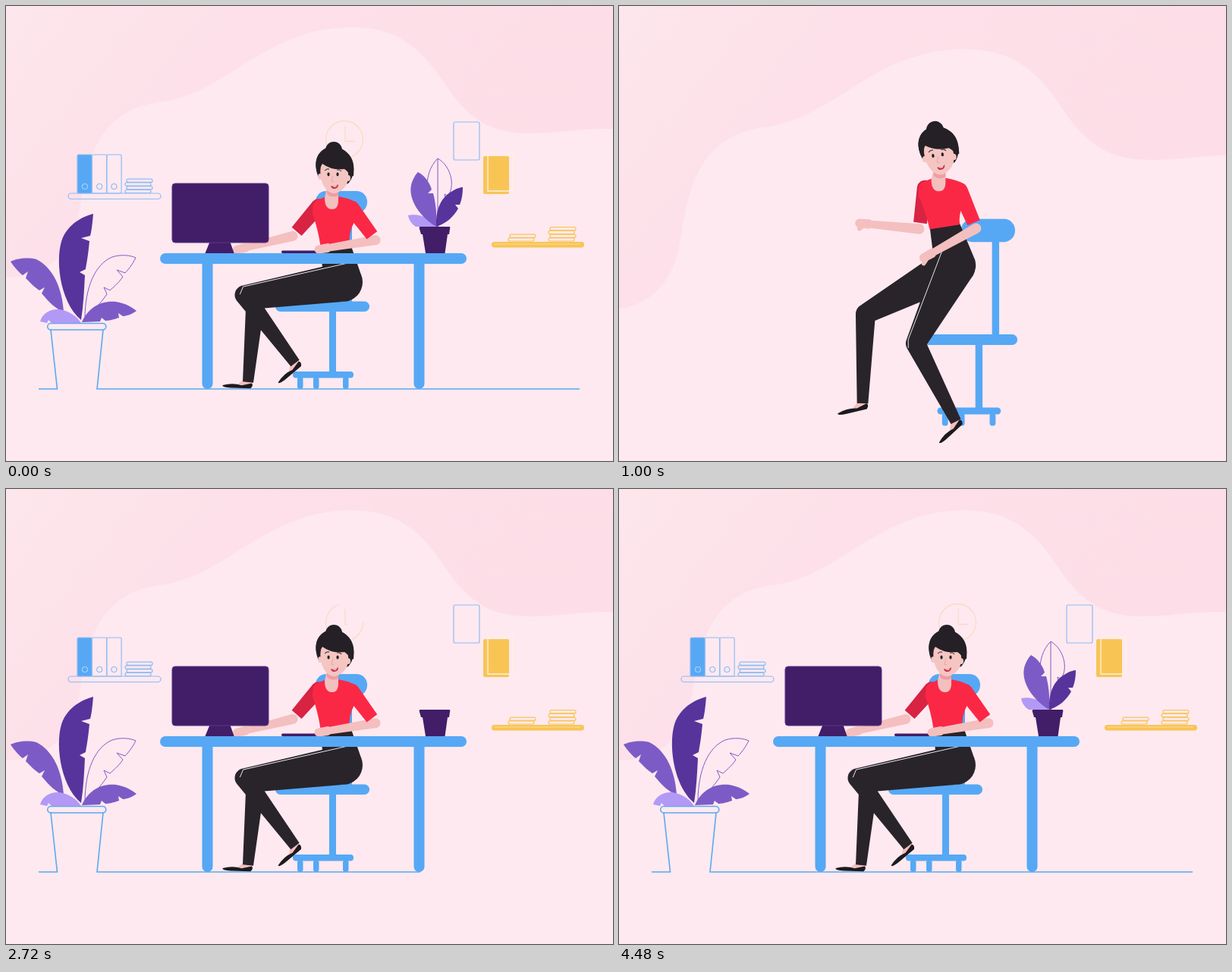
Animation of 800x600 px, one loop 4.52 s. Source, as an HTML page:

```html
<!DOCTYPE html>
<html lang="en">
<head>
<meta charset="utf-8">
<title>Desk scene</title>
<style>
html, body { margin: 0; width: 100%; height: 100%; overflow: hidden; background: #fddfe8; }
svg { display: block; width: 100vw; height: 100vh; }
</style>
</head>
<body>
<svg id="stage" viewBox="0 0 800 600"></svg>
<script>
const LOOP = 4520, STEP = 40;
const BLUE = '#56a8f5', THIN = '#8fbcf4', GOLD = '#f8c555', PLUM = '#421d68';
const DARK = '#57349b', MID = '#7c5bc7', LILAC = '#b299f5';
const RED = '#fb2845', WINE = '#d82343', SKIN = '#f4bfbf', BLACK = '#28242a';

const box = (x, y, w, h, r, attrs) =>
  `<rect x="${x}" y="${y}" width="${w}" height="${h}" rx="${r}" ${attrs}/>`;
const shape = (id, d, attrs) => `<path id="${id}" d="${d}" ${attrs}/>`;
const fill = c => `fill="${c}"`;
const line = (c, w = 1.2) => `fill="none" stroke="${c}" stroke-width="${w}"`;
const repeat = (n, draw) => Array.from({ length: n }, (_, i) => draw(i)).join('');
const sheets = (x, bottom, n, c) => repeat(n, i =>
  box(x + (i % 2 ? 2 : 0), bottom - 4.7 * (i + 1), 34, 4.2, 2, line(c)));

const binders = box(94, 196, 19.3, 51, 1.5, fill(BLUE) + ' id="binderFill"') +
  repeat(3, i => box(94 + 19.4 * i, 196, 19.3, 51, 1.5, line(THIN)));
const rings = repeat(3, i => `<circle cx="${104 + 19.2 * i}" cy="238" r="3.5" ${line(i ? THIN : '#a5cffa')}/>`);
const casters = [384, 405, 444].map(x => box(x, 489, 7.5, 16, 3.5, '')).join('');

const head = `
  <circle cx="3" cy="-70" r="11"/>
  <path d="M-17-34C-24-52-21-66-6-72 4-76 14-73 21-66 32-57 32-36 22-26Q8-20-10-36Z"/>
  <g id="face" fill="#f5c5c2">
    <ellipse cx="-15" cy="-35" rx="2.8" ry="4"/>
    <path d="M-14-52C-16-38-14-26-6-17Q2-10 10-15 20-20 22-32V-50Z"/>
    <ellipse cx="22" cy="-33" rx="3" ry="4"/>
    <g fill="#211e24"><ellipse cx="-4" cy="-38" rx="1.6" ry="2.4"/><ellipse cx="8" cy="-38" rx="1.6" ry="2.4"/></g>
    <path d="M-9-43q3-3 6-2M7-44q4-1 6 2" ${line('#28242a', 1)}/>
    <path d="M2-36l-2 7 3 1" ${line('#eaa5a5', 1)}/>
    <path d="M-1-23q6 2 10-2 0 6-6 6-3 0-4-4z" fill="#c9304a"/>
    <path d="M1-22.500q4 1 6-1-1 4-6 1z" fill="#fff"/>
  </g>
  <path d="M-19-40C-26-68-6-76 4-74 20-73 32-58 29-36L25-35Q22-42 17-45 0-43-12-52-15-48-15-42Z"/>`;

const foot = `<path d="M-6-3H6L6 4-15 6Z" ${fill(SKIN)}/>
  <path d="M-33 7Q-20 2-8 5L5 1Q8 4 4 8L-22 9.500Q-34 10-33 7Z" fill="#1d1a1f"/>`;

stage.innerHTML = `
<defs>
  <linearGradient id="sky" x1="0" y1="0" x2="1" y2=".6">
    <stop offset="0" stop-color="#fde6ec"/><stop offset=".3" stop-color="#fde0e9"/><stop offset="1" stop-color="#fddde7"/>
  </linearGradient>
  <clipPath id="aboveDesk"><rect width="800" height="330"/></clipPath>
</defs>
<rect width="800" height="600" fill="url(#sky)"/>
<g id="hill"><path fill="#fee9f0" d="M-80 362C-50 364-20 359 0 358 60 356 84 324 95 280 105 220 112 140 200 127 290 118 340 28 455 28 520 28 550 60 580 105 610 150 640 168 690 168 730 168 760 161 800 162L900 160V760H-80Z"/></g>
<g id="world">
  ${shape('ground', 'M43 505H67.500L59 427A4 4 0 0 1 59 418.500H127A4 4 0 0 1 128 427L120 505H756', line('#5ba9f0', 1.6))}
  ${shape('rim', 'M58 427H128', line('#5ba9f0', 1.6))}
  ${shape('leafLeft', 'M76 403C74 372 62 345 40 334 28 331 14 333 6 337 12 346 18 352 22 355l7-5-3 9C35 368 38 371 44 375l7-4-4 8C58 392 65 399 76 403Z', fill(MID))}
  ${shape('leafOutline', 'M104 413C104 370 118 340 140 331 152 327 165 329 171 332 166 342 160 349 157 352l-11-4 8 9C148 366 140 372 137 375l-8-4 4 9C125 392 115 402 104 413', line(MID, 1))}
  ${shape('leafTall', 'M99 414C70 390 64 330 75 305 86 283 105 277 115 274 114 285 113 296 111 303l-12 3 11 4C108 330 107 335 105 347l-8 4 7 4C103 375 102 395 99 414Z', fill(DARK))}
  ${shape('leafLow', 'M45 416C48 404 60 399 70 400 84 402 94 410 99 418H60l-4-4-2 4Z', fill(LILAC))}
  ${shape('leafRight', 'M100 417C108 398 125 388 145 390 158 392 167 398 172 402 165 407 158 409 154 409l-6-4 1 6C140 414 135 415 131 415l-5-4-2 5Z', fill(MID))}
  <g id="blueShelf">
    ${box(82, 247, 122, 7.5, 3.7, line(THIN))}
    <g id="binders">${binders}</g>
    <g id="shelfBits">${rings}${sheets(157, 247, 4, THIN)}</g>
  </g>
  ${shape('frame', 'M624 172V155Q624 153 622 153H592Q590 153 590 155V201Q590 203 592 203H622Q624 203 624 201Z', line(THIN) + ' pathLength="1"')}
  <g id="note">${box(629, 198, 34, 50, 2, fill(GOLD))}</g>
  ${shape('noteLine', 'M668 212V195H635V244H668Z', line('#fff1df', 1.3) + ' pathLength="1"')}
  <g id="goldShelf">
    ${box(640, 311, 122, 7.5, 3.7, fill(GOLD))}
    <path d="M643 314H757" ${line('#fbdc98', 1)}/>
    <g id="goldSheets">${sheets(662, 310.5, 2, GOLD)}${sheets(715, 310.5, 4, GOLD)}</g>
  </g>
  <g id="clock" ${line('#f8ddc3', 1.3)}>
    <circle cx="446" cy="176" r="24.500" pathLength="1"/><path d="M447 158V178.500H460" pathLength="1"/>
  </g>
</g>
<g id="chair" ${fill(BLUE)}>
  <g id="seat">${box(355, 389.5, 124, 13.5, 6.7, '')}</g>
  <rect id="post" x="426" width="9"/>
  <rect id="backPost" x="447" width="9"/>
  <g id="back">${box(408, 244, 68, 29, 14, '')}</g>
  ${box(378, 482, 80, 8.5, 4, '')}${casters}
</g>
<g id="keyboard">${box(363, 322.5, 52, 3.5, 1.7, fill(PLUM))}</g>
<g id="woman">
  ${shape('arm1', '', fill(SKIN))}${shape('sleeve1', '', fill(WINE))}
  <g id="foot1">${foot}</g><g id="foot2">${foot}</g>
  ${shape('legs', '', fill(BLACK))}${shape('seam', '', line('#e8e4e8', 1))}
  ${shape('shirt', '', fill(RED))}
  <g id="neck"><path d="M-6-20H9V-4Q9 8 1 8-9 8-9-7Z" ${fill(SKIN)}/><path d="M-6-20H9V-10Q0-6-6-12Z" fill="#ee9da3"/></g>
  <g id="head" fill="#242026">${head}</g>
  ${shape('arm2', '', fill(SKIN))}${shape('sleeve2', '', fill(RED))}
</g>
<g clip-path="url(#aboveDesk)"><g id="monitor" ${fill(PLUM)}>
  <path d="M269 310H295L301 327H262Z"/>${box(219, 234, 127, 78, 4, 'stroke="#5d3785"')}
</g></g>
<g ${fill(BLUE)}>
  <rect id="deskLeg1" x="258.500" y="332" width="14" rx="7"/><rect id="deskLeg2" x="537.500" y="332" width="14" rx="7"/>
  <rect id="deskTop" x="203" y="326" height="14" rx="7"/>
</g>
<g id="pot">
  ${shape('potCentre', 'M569 291C552 260 548 222 569 201 588 212 592 240 582 250l-4-2 1 6C577 268 573 280 569 291V201', line(MID, 1))}
  ${shape('potLow', 'M530 276C545 273 560 280 566 291H540Q531 285 530 276Z', fill(LILAC))}
  ${shape('potLeft', 'M567 291C545 278 530 255 534 236 536 228 540 222 543 219 552 224 558 232 561 242l-5 5 7 0C567 262 568 278 567 291Z', fill(MID))}
  ${shape('potRight', 'M567 291C566 270 572 252 590 243 595 240 600 239 602 239 602 250 600 257 598 262l-6 0 4 5C590 278 580 287 567 291Z', fill(DARK))}
  <path d="M546 291H584Q586 291 585 294L584 301H582L578.500 326H553L549 301H547L545 294Q544 291 546 291Z" ${fill(PLUM)}/>
</g>`;

const el = {};
stage.querySelectorAll('[id]').forEach(n => el[n.id] = n);
const set = (id, attrs) => { for (const k in attrs) el[id].setAttribute(k, attrs[k]); };
const move = (id, transform) => set(id, { transform });
const fade = (id, opacity) => set(id, { opacity });

// Easing
const smooth = u => u * u * (3 - 2 * u);
const easeIn = u => u * u;
const easeOut = u => 1 - (1 - u) ** 2;
const backOut = u => 1 - 2.2 * (1 - u) ** 3 + 1.2 * (1 - u) ** 2;
const progress = (t, start, end) => Math.min(1, Math.max(0, (t - start) / (end - start)));
const tween = (t, start, end, from, to, ease = smooth) =>
  from + (to - from) * ease(progress(t, start, end));
const settle = (t, end) => (1 + Math.cos(Math.PI * progress(t, 0, end))) / 2;
const bump = (t, start, end) => Math.sin(Math.PI * progress(t, start, end)) ** 2;

// Monotone cubic through key values.
function spline(t, times, values) {
  const n = values.length;
  if (t <= times[0]) return values[0];
  if (t >= times[n - 1]) return values[n - 1];
  const i = times.findIndex(x => x >= t) - 1;
  const slope = j => (values[j + 1] - values[j]) / (times[j + 1] - times[j]);
  const tangent = j => {
    if (j < 1 || j > n - 2) return 0;
    const a = slope(j - 1), b = slope(j);
    return a * b <= 0 ? 0 : 2 * a * b / (a + b);
  };
  const h = times[i + 1] - times[i], u = (t - times[i]) / h, w = 1 - u;
  return values[i] * w * w * (1 + 2 * u) + values[i + 1] * u * u * (3 - 2 * u)
    + h * (tangent(i) * u * w * w - tangent(i + 1) * u * u * w);
}

// Key points: standing, lowering, leaning back, reaching, typing. The last one holds.
const poseTimes = [680, 1000, 1600, 2280, 2600];
const keyPoints = {
  neck: [[419, 311], [421, 236], [434, 258], [433, 260], [429, 260]],
  head: [[413, 260], [421, 188], [449, 213], [434, 213], [433, 214]],
  hand1: [[361, 426], [323, 287], [315, 240], [316, 303], [310, 320]],
  hand2: [[448, 404], [407, 329], [382, 272], [412, 317], [418, 320]],
  hip: [[437, 398], [443, 342], [442, 362], [444, 364]],
  knee1: [[374, 527], [325, 406], [316, 330], [329, 387]],
  ankle1: [[390, 649], [321, 524], [306, 442], [319, 496]],
  knee2: [[420, 540], [391, 445], [342, 315], [314, 381]],
  ankle2: [[470, 652], [444, 548], [302, 415], [381, 471]]
};
const pose = (t, values) => spline(t, poseTimes, values);

const add = (p, x, y) => [p[0] + x, p[1] + y];
const along = (p, d, l) => add(p, d[0] * l, d[1] * l);
const mix = (a, b, u) => [a[0] + (b[0] - a[0]) * u, a[1] + (b[1] - a[1]) * u];
const gap = (a, b) => Math.hypot(b[0] - a[0], b[1] - a[1]);
const dir = (a, b) => { const l = gap(a, b) || 1; return [(b[0] - a[0]) / l, (b[1] - a[1]) / l]; };
const xy = p => p[0].toFixed(2) + ' ' + p[1].toFixed(2);

// Middle joint of a two-bone arm.
function elbowOf(shoulder, hand, upper, lower) {
  const l = gap(shoulder, hand), d = dir(shoulder, hand);
  const a = Math.min(upper, (upper ** 2 - lower ** 2 + l ** 2) / (2 * l));
  return along(along(shoulder, d, a), [d[1], -d[0]], Math.sqrt(Math.max(0, upper ** 2 - a ** 2)));
}

// Tapered capsule, optionally flat at its far end.
function limb(a, ra, b, rb, flat) {
  const [x, y] = dir(a, b);
  const side = (p, r) => xy(add(p, -y * r, x * r));
  return `M${side(a, ra)}A${ra} ${ra} 0 0 1 ${side(a, -ra)}L${side(b, -rb)}` +
    (flat ? 'L' : `A${rb} ${rb} 0 0 1 `) + side(b, rb) + 'Z';
}

function arm(n, shoulder, hand, z) {
  const elbow = elbowOf(shoulder, hand, 52 * z, 70 * z), d = dir(elbow, hand);
  const tip = along(hand, d, 6 * z), thumb = add(tip, 0, 7 * z);
  set('arm' + n, { d: limb(elbow, 6.5 * z, hand, 4.5 * z) + limb(mix(hand, elbow, .08), 6 * z, tip, 5.5 * z)
    + limb(hand, 4 * z, thumb, 2.8 * z) });
  set('sleeve' + n, { d: limb(shoulder, 10 * z, mix(shoulder, elbow, .85), 8.5 * z, true) });
}

function drawWoman(t, z) {
  const j = {};
  for (const name in keyPoints)
    j[name] = [0, 1].map(axis => pose(t, keyPoints[name].map(p => p[axis])));
  const shift = (name, x, y) => j[name] = add(j[name], x, y);

  const stride = Math.sin(Math.max(0, 680 - t) / 75);
  const walk = 540 * (1 - progress(t, 40, 680)) ** 1.7;
  [1, -1].forEach((s, i) => {
    shift('knee' + (i + 1), 28 * s * stride, -6 * s * stride);
    shift('ankle' + (i + 1), 65 * s * stride, -12 * s * stride);
  });
  move('woman', `translate(${walk} ${-4 * Math.abs(stride)})`);

  const hop = bump(t, 1000, 1320);
  for (const name of ['neck', 'head', 'hand1', 'hand2']) shift(name, 0, -16 * hop);
  shift('knee1', -8 * hop, -20 * hop);
  shift('ankle1', -45 * hop, -25 * hop);

  const { neck, hip } = j, hipSize = 26 * z;
  const waist = add(along(neck, dir(neck, hip), 53 * z), -3, 0);
  const s1 = add(neck, -17 * z, 4 * z), s2 = add(neck, 27 * z, 7 * z);
  arm(1, s1, j.hand1, z);
  arm(2, s2, j.hand2, z);

  const dangle = pose(t, [-10, -12, -32, 0]);
  let legs = limb(waist, 19 * z, hip, hipSize);
  for (const n of [1, 2]) {
    const knee = j['knee' + n], ankle = j['ankle' + n], shin = dir(knee, ankle);
    legs += limb(hip, hipSize, knee, 12.5 * z) + limb(knee, 12.5 * z, ankle, 7 * z, true);
    const angle = -Math.atan2(shin[0], shin[1]) * 180 / Math.PI + dangle;
    move('foot' + n, `translate(${xy(ankle)}) rotate(${angle}) scale(${z})`);
  }
  set('legs', { d: legs });

  const thigh = dir(hip, j.knee2), shin = dir(j.knee2, j.ankle2), normal = [-thigh[1], thigh[0]];
  const from = along(along(hip, normal, 24), thigh, -10), bend = along(j.knee2, normal, 11);
  const turn = dir([0, 0], add(thigh, ...shin));
  set('seam', { d: `M${xy(from)}L${xy(bend)}L${xy(along(bend, turn, 11))}` });

  const at = (p, x, y) => xy(add(p, x * z, y * z));
  set('shirt', { d: `M${at(neck, -9, -8)}L${at(s1, -2, -8)}Q${at(s1, -9, -5)} ${at(s1, -8, 10)}`
    + `Q${at(mix(s1, waist, .6), -14, 0)} ${at(waist, -19, 4)}L${at(waist, 19, -2)}`
    + `Q${at(mix(s2, waist, .6), 9, 0)} ${at(s2, 9, 8)}L${at(s2, 6, -8)}Q${at(s2, -2, -13)} ${at(neck, 8, -9)}Z` });
  move('neck', `translate(${xy(neck)}) scale(${z})`);
  const idle = 1.4 * bump(t, 2600, 4480), tilt = pose(t, [-11, -8, 18, 9, 0]);
  move('head', `translate(${xy(add(j.head, idle, 0))}) rotate(${tilt + idle}) scale(${z}) translate(-4 46)`);
  move('face', `translate(${-.2 * Math.max(0, tilt)} 0)`);
}

function drawChair(t, z, y) {
  const slide = spline(t, [40, 680, 1000, 1640], [640, 114, 45, 0]);
  move('chair', `translate(${455 * (1 - z) + slide} ${y - tween(t, 680, 1060, 24, 0)}) scale(${z})`);
  const seat = tween(t, 620, 860, 22, 0), back = tween(t, 670, 960, 154, 0);
  move('seat', `translate(0 ${seat})`);
  move('back', `translate(0 ${back})`);
  set('post', { y: 396 + seat, height: 90 - seat });
  set('backPost', { y: 258 + back, height: Math.max(0, 138 + seat - back) });
}

const reveal = (node, u) => {
  node.setAttribute('stroke-dasharray', `${u} 2`);
  node.setAttribute('opacity', u > .001 ? 1 : 0);
};
const leaf = (id, x, y, angle, size) =>
  move(id, `translate(${x} ${y}) rotate(${angle}) scale(${size}) translate(${-x} ${-y})`);

function drawRoom(t) {
  move('blueShelf', `translate(${tween(t, 1160, 1440, -240, 0, easeOut)} 0)`);
  fade('shelfBits', tween(t, 1440, 1640, 0, 1));
  move('binders', `translate(0 247) scale(1 ${tween(t, 1600, 1920, 0, 1)}) translate(0 -247)`);
  fade('binderFill', tween(t, 2080, 2560, 0, 1));
  reveal(el.frame, tween(t, 1260, 1780, 0, 1, easeOut));
  reveal(el.noteLine, tween(t, 1360, 1800, 0, 1, easeOut));
  move('note', `translate(${tween(t, 1200, 1840, 200, 0, easeOut)} 0) rotate(${tween(t, 1200, 1920, -60, 0)} 646 223)`);
  fade('note', tween(t, 1200, 1800, 0, 1, easeOut));
  move('goldShelf', `translate(${tween(t, 1660, 2080, 180, 0, easeOut)} 0)`);
  fade('goldSheets', tween(t, 2080, 2440, 0, 1));
  for (const part of el.clock.children) reveal(part, tween(t, 2400, 2900, 0, 1));

  const drawn = spline(t, [1420, 1600, 2280, 3280, 4520], [0, 127, 570, 807, 915]);
  set('ground', { 'stroke-dasharray': `${drawn} 2000`, opacity: drawn > 0 ? 1 : 0 });
  fade('rim', tween(t, 1760, 1920, 0, 1));

  const size = tween(t, 1760, 2240, 0, 1, backOut);
  leaf('leafTall', 99, 416, tween(t, 1740, 2240, -14, 0), size);
  leaf('leafLeft', 76, 403, tween(t, 1800, 2700, 38, 0), size);
  leaf('leafOutline', 104, 413, tween(t, 1800, 2700, -31, 0), size);
  leaf('leafLow', 99, 418, tween(t, 1800, 2300, 30, 0), size);
  leaf('leafRight', 100, 417, tween(t, 1800, 2400, -30, 0), size);
}

function drawDesk(t) {
  set('deskTop', { width: tween(t, 1760, 2520, 0, 404, easeOut) });
  set('deskLeg1', { height: tween(t, 2220, 2600, 0, 173) });
  set('deskLeg2', { height: tween(t, 2400, 2720, 0, 173) });
  move('monitor', `translate(${tween(t, 2080, 2540, -18, 0)} ${tween(t, 2080, 2540, 110, 0, easeOut)}) rotate(${tween(t, 2080, 2540, -3.4, 0)} 282 273)`);
  fade('keyboard', tween(t, 2120, 2200, 0, 1));
  move('keyboard', `rotate(${tween(t, 2120, 2480, -14, 0)} 363 324)`);

  move('pot', `translate(0 ${tween(t, 2160, 2480, -372, 0, easeIn)}) rotate(${tween(t, 2240, 2480, 14, 0)} 565 310)`);
  const spread = tween(t, 2900, 3900, 1.5, 0);
  const size = tween(t, 2720, 3200, 0, 1, backOut) * (1 + .05 * spread);
  leaf('potCentre', 569, 291, 0, size);
  leaf('potLow', 566, 291, 40 * spread, size);
  leaf('potLeft', 567, 291, 13 * spread, size);
  leaf('potRight', 567, 291, -15 * spread, size);
}

function draw(ms) {
  const phase = Math.floor((ms % LOOP) / STEP) * STEP;
  const t = phase < STEP ? LOOP : phase;
  const z = 1 + .098 * settle(t, 1900), y = 146 * settle(t, 1400);
  const camera = `translate(${455 * (1 - z)} ${y}) scale(${z})`;
  move('hill', camera);
  move('world', camera);
  drawRoom(t);
  drawChair(t, z, y);
  drawWoman(t, z);
  drawDesk(t);
}

const start = performance.now();
function tick() {
  draw(performance.now() - start);
  requestAnimationFrame(tick);
}
draw(0);
requestAnimationFrame(tick);
</script>
</body>
</html>
```
